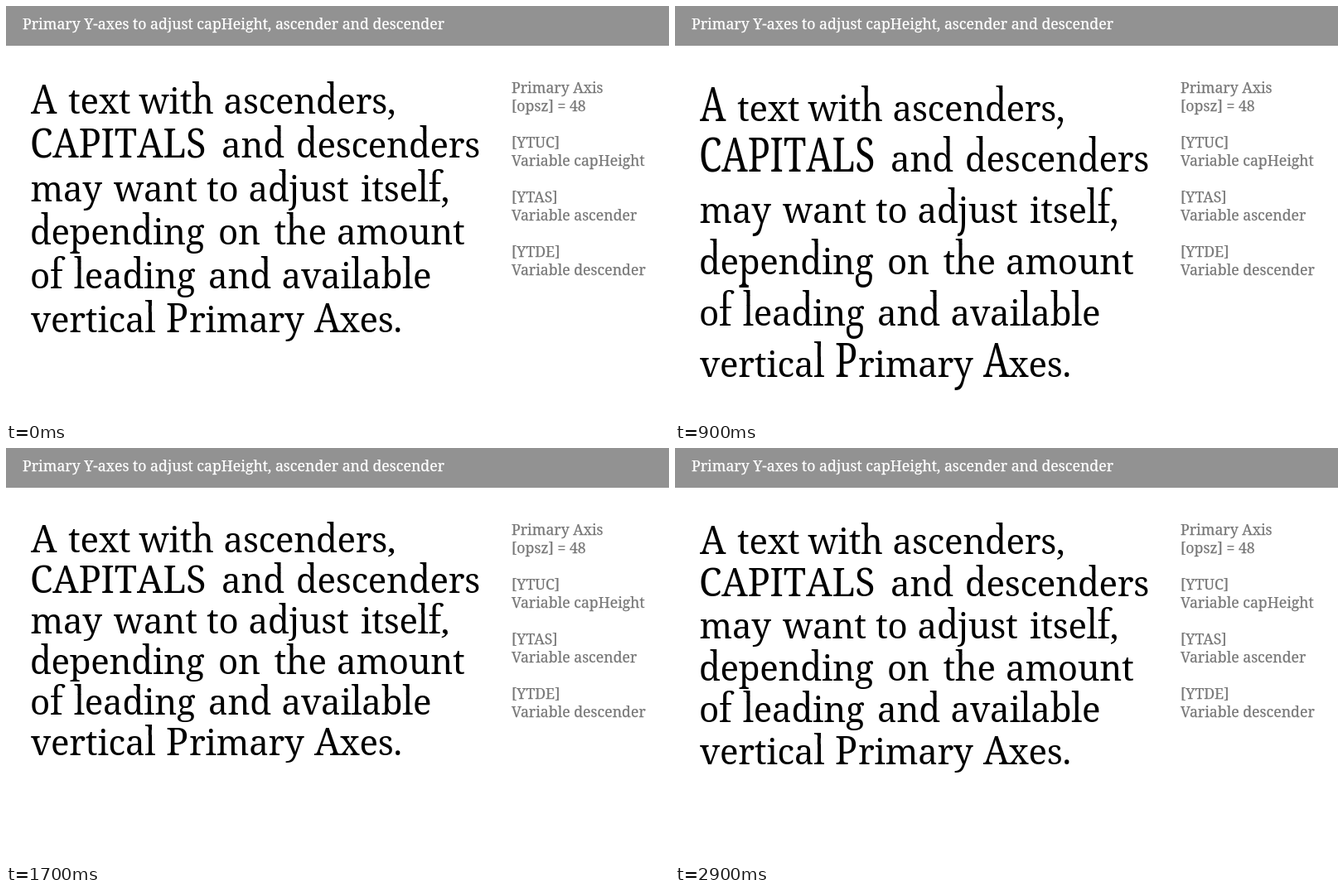
Recreate the animation shown at these times as an HTML page. Size 800 by 500 pixels, loop 3 s.

```html
<!DOCTYPE html>
<html lang="en">
<head>
<meta charset="utf-8">
<title>Primary Y-axes</title>
<style>
  html, body { margin: 0; width: 100%; height: 100%; overflow: hidden; background: #fff; }
  svg { display: block; width: 800px; height: 500px; }
  text { white-space: pre; font-family: "Noto Serif", serif; font-kerning: none; font-variant-ligatures: none; }
  .label { font-size: 17.7px; stroke-width: .25px; font-kerning: normal; }
  .lower { font-size: 42px; letter-spacing: -.25px; }
  .caps { font-size: 44.5px; }
</style>
</head>
<body>
<svg id="stage" viewBox="0 0 800 500">
  <rect width="800" height="500" fill="#fff"/>
  <rect width="800" height="48" fill="#929292"/>
</svg>
<script>
const LOOP = 3000, STEP = 100;
const NS = "http://www.w3.org/2000/svg";
const stage = document.getElementById("stage");

function add(parent, tag, attrs = {}, content = "") {
  const node = document.createElementNS(NS, tag);
  for (const key in attrs) node.setAttribute(key, attrs[key]);
  node.textContent = content;
  parent.appendChild(node);
  return node;
}

const addLabel = (x, y, color, label) =>
  add(stage, "text", { class: "label", x, y, fill: color, stroke: color }, label);

addLabel(20, 28, "#fff", "Primary Y-axes to adjust capHeight, ascender and descender");
["Primary Axis", "[opsz] = 48", "", "[YTUC]", "Variable capHeight", "",
 "[YTAS]", "Variable ascender", "", "[YTDE]", "Variable descender"]
  .forEach((label, i) => addLabel(610, 105 + 22 * i, "#777", label));

// Each line: pieces of text with the x where they start.
const LINES = [
  [["A", 30], ["text", 75], ["with", 160.5], ["ascenders,", 262.5]],
  [["CAPITALS", 29], ["and", 260], ["descenders", 350]],
  [["may", 29.5], ["want", 130], ["to", 242], ["adjust", 292.5], ["itself,", 428]],
  [["depending", 29], ["on", 256], ["the", 323.5], ["amount", 399]],
  [["of", 29], ["leading", 82], ["and", 244], ["available", 332.5]],
  [["vertical", 30], ["P", 193], ["rimary", 221], ["A", 372], ["xes.", 402.5]]
];

// Letters are cut into horizontal bands, so ascenders and descenders can
// grow while the x-height stays the same. y is relative to the baseline.
const STEM_LOW = -24, STEM_HIGH = -26, TAIL = 1;
const BASE = { cap: 31.8, ascender: 31.9, descender: 10.1 };
const FIXED = /([tij])/;
const BANDS = {
  body:  { top: STEM_LOW - 0.5, bottom: TAIL, shows: () => true },
  fixed: { top: -60, bottom: STEM_LOW, shows: part => FIXED.test(part) },
  stem:  { top: STEM_HIGH, bottom: STEM_LOW, shows: part => !FIXED.test(part) },
  top:   { top: -60, bottom: STEM_HIGH + 0.5, shows: part => !FIXED.test(part) },
  tail:  { top: TAIL, bottom: 30, shows: () => true }
};

const defs = add(stage, "defs");
for (const name in BANDS) {
  const { top, bottom } = BANDS[name];
  const clip = add(defs, "clipPath", { id: "clip-" + name });
  add(clip, "rect", { x: 0, y: top, width: 800, height: bottom - top });
}

function addWord(parent, word, x, shows) {
  const text = add(parent, "text", { class: "lower", x, y: 0 });
  for (const part of word.split(FIXED).filter(Boolean))
    add(text, "tspan", { fill: shows(part) ? "#000" : "none" }, part);
}

const lines = LINES.map(pieces => {
  const group = add(stage, "g");
  const isCaps = ([word]) => /^[A-Z]+$/.test(word);
  const caps = add(group, "g");
  for (const [word, x] of pieces.filter(isCaps)) add(caps, "text", { class: "caps", x, y: 0 }, word);
  const bands = {};
  for (const name in BANDS) {
    bands[name] = add(group, "g");
    const clipped = add(bands[name], "g", { "clip-path": `url(#clip-${name})` });
    for (const [word, x] of pieces.filter(p => !isCaps(p))) addWord(clipped, word, x, BANDS[name].shows);
  }
  return { group, caps, bands };
});

const move = (node, transform) => node.setAttribute("transform", transform);
const stretchFrom = (y, scale) => `translate(0 ${y}) scale(1 ${scale}) translate(0 ${-y})`;

function draw(time) {
  const step = Math.floor((time % LOOP) / STEP) * STEP;
  const swing = Math.sin(2 * Math.PI * step / LOOP);
  const first = 130 + 9 * swing;
  const leading = 52.8 + 9.6 * swing;
  const cap = 35 + 6 * swing;
  const rise = 38.5 + 4.5 * swing - BASE.ascender;
  const descender = 11.3 + 5.5 * swing;
  const stemHeight = STEM_LOW - STEM_HIGH;

  lines.forEach(({ group, caps, bands }, i) => {
    move(group, `translate(0 ${Math.round(first + leading * i)})`);
    move(caps, `scale(1 ${cap / BASE.cap})`);
    move(bands.stem, stretchFrom(STEM_LOW, (stemHeight + rise) / stemHeight));
    move(bands.top, `translate(0 ${-rise})`);
    move(bands.tail, stretchFrom(TAIL, (descender - TAIL) / (BASE.descender - TAIL)));
  });
}

const start = performance.now();
function tick() {
  draw(performance.now() - start);
  requestAnimationFrame(tick);
}
tick();
</script>
</body>
</html>
```
